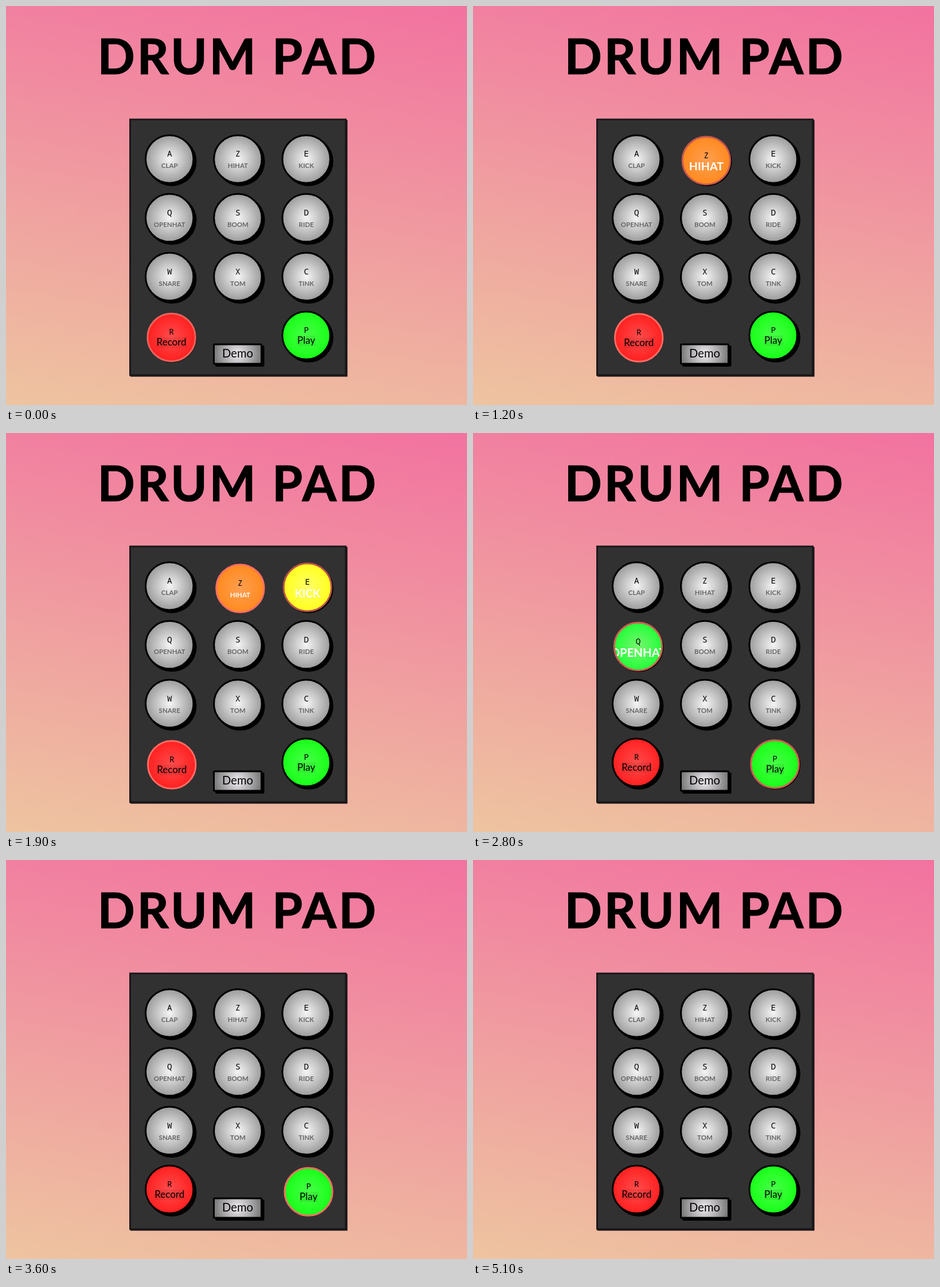
An HTML page for the animation above (6300 ms loop, 804 by 697 pixels).

```html
<!DOCTYPE html>
<html lang="en">
<head>
<meta charset="utf-8">
<title>Drum Pad</title>
<style>
  html, body { margin: 0; width: 100%; height: 100%; overflow: hidden; }
  body { background: linear-gradient(10deg, #eec4a0, #f272a0); }
  svg { display: block; width: 804px; height: 697px; }
  text { text-anchor: middle; font-family: Lato, "Open Sans", sans-serif; }
  .title { font-size: 85.5px; font-weight: 700; letter-spacing: 4px; stroke: #000; stroke-width: 1.2px; }
  .letter { font-family: "Noto Sans Mono", monospace; font-size: 14.4px; font-weight: 500; }
  .sound { font-weight: 700; }
  .label { font-size: 17px; }
  .demo { font-size: 20.2px; }
</style>
</head>
<body>
<svg viewBox="0 0 804 697">
  <defs id="defs">
    <clipPath id="face"><circle r="40.25"/></clipPath>
    <radialGradient id="steel" gradientUnits="userSpaceOnUse" cx="404" cy="607.5" r="44">
      <stop stop-color="#f2eef4"/><stop offset="1" stop-color="#707070"/>
    </radialGradient>
    <filter id="soft"><feGaussianBlur stdDeviation=".5"/></filter>
  </defs>
  <text class="title" x="404.5" y="118.5">DRUM PAD</text>
  <rect x="217" y="199" width="378.5" height="448.5" fill="#141214" filter="url(#soft)"/>
  <rect x="216.5" y="198.2" width="376" height="446.5" fill="#313131" stroke="#1b191b" stroke-width="3"/>
  <g id="pad"></g>
  <rect x="365" y="593" width="85.5" height="37" rx="2"/>
  <rect x="362.5" y="591" width="83" height="34" rx="1" fill="url(#steel)" stroke="#000" stroke-width="3"/>
  <text class="demo" x="404" y="613.5">Demo</text>
</svg>
<script>
const LOOP = 6300, STEP = 100;
const TRAVEL = 4, EASE = 100, SWELL = 200, HOLD = 300;
const RADIUS = 41.75, LINE = 3;
const SOUND_SIZE = 11.5;
const BORDER = [251, 110, 102];
const COLS = [285.2, 404.4, 523.7];
const rowY = row => 267.4 + 102.7 * row;

const fills = {
  idle: ['#f5f5f5', '#9b9b9b'],
  orange: ['#ff9f52', '#ff8a1e'],
  yellow: ['#ffff68', '#ffff1e'],
  green: ['#78f570', '#22ff38'],
  cyan: ['#7cf4ff', '#22e4ff'],
  blue: ['#6c94ff', '#2260ff'],
  red: ['#ff4c4c', '#ff2020'],
  lime: ['#48ff48', '#18ff18']
};

// letter, name, column, row, lit colour, press times
const drums = [
  ['A', 'CLAP', 0, 0], ['Z', 'HIHAT', 1, 0, 'orange', [1137, 1630, 3735, 4218]],
  ['E', 'KICK', 2, 0, 'yellow', [1330, 1845, 3930, 4735]],
  ['Q', 'OPENHAT', 0, 1, 'green', [25, 2728]],
  ['S', 'BOOM', 1, 1, 'cyan', [430, 3030]],
  ['D', 'RIDE', 2, 1, 'blue', [635, 3230]],
  ['W', 'SNARE', 0, 2], ['X', 'TOM', 1, 2], ['C', 'TINK', 2, 2]
];

// letter, name, column, colour, pressed, released, label box width
const controls = [
  ['R', 'Record', 0, 'red', -85, 2400, 54],
  ['P', 'Play', 2, 'lime', 2728, 5100, 32]
];

function el(parent, name, attrs, text) {
  const node = document.createElementNS('http://www.w3.org/2000/svg', name);
  for (const key in attrs) node.setAttribute(key, attrs[key]);
  if (text) node.textContent = text;
  return parent.appendChild(node);
}

const defs = document.getElementById('defs');
const pad = document.getElementById('pad');

for (const name in fills) {
  const grad = el(defs, 'radialGradient', { id: name, r: 0.5 });
  fills[name].forEach((color, i) => el(grad, 'stop', { offset: i, 'stop-color': color }));
}

function makeKey(x, y, fill) {
  el(pad, 'circle', { cx: x + TRAVEL, cy: y + TRAVEL, r: RADIUS + LINE / 2 });
  const group = el(pad, 'g');
  const disc = el(group, 'circle', { r: RADIUS, fill: `url(#${fill})`, 'stroke-width': LINE });
  const text = el(group, 'g', { 'clip-path': 'url(#face)' });
  return { x, y, group, disc, text };
}

function setPress(key, age) {
  const p = Math.min(1, Math.max(0, age / EASE));
  const glow = Math.sqrt(p);
  key.group.setAttribute('transform', `translate(${key.x + TRAVEL * p} ${key.y + TRAVEL * p})`);
  key.disc.setAttribute('stroke', `rgb(${BORDER.map(c => Math.round(c * glow))})`);
}

function makeDrum([letter, name, col, row, lit = 'idle', presses = []]) {
  const key = makeKey(COLS[col], rowY(row), 'idle');
  el(key.text, 'text', { class: 'letter', y: -4.2 }, letter);
  const sound = el(key.text, 'text', { class: 'sound' }, name);
  return t => {
    const start = presses.find(at => t >= at && t < at + HOLD);
    const on = start !== undefined;
    const age = on ? t - start : 0;
    const size = SOUND_SIZE * (1 + 0.85 * Math.sin(Math.PI * Math.min(1, age / SWELL)));
    setPress(key, age);
    key.disc.setAttribute('fill', `url(#${on ? lit : 'idle'})`);
    sound.setAttribute('fill', on ? '#fff' : '#666');
    sound.setAttribute('font-size', size);
    sound.setAttribute('y', 13.9 + 0.18 * size);
  };
}

function makeControl([letter, name, col, fill, from, to, width]) {
  const key = makeKey(COLS[col], rowY(3), fill);
  el(key.text, 'rect', { x: -width / 2, y: 0, width, height: 18, opacity: 0.07 });
  el(key.text, 'text', { class: 'letter', y: -4.6 }, letter);
  el(key.text, 'text', { class: 'label', y: 14.4 }, name);
  return t => setPress(key, t >= from && t < to ? t - from : 0);
}

const parts = [...drums.map(makeDrum), ...controls.map(makeControl)];
const begin = performance.now();

function draw() {
  const t = Math.floor((performance.now() - begin) % LOOP / STEP) * STEP;
  parts.forEach(update => update(t));
  requestAnimationFrame(draw);
}
draw();
</script>
</body>
</html>
```
